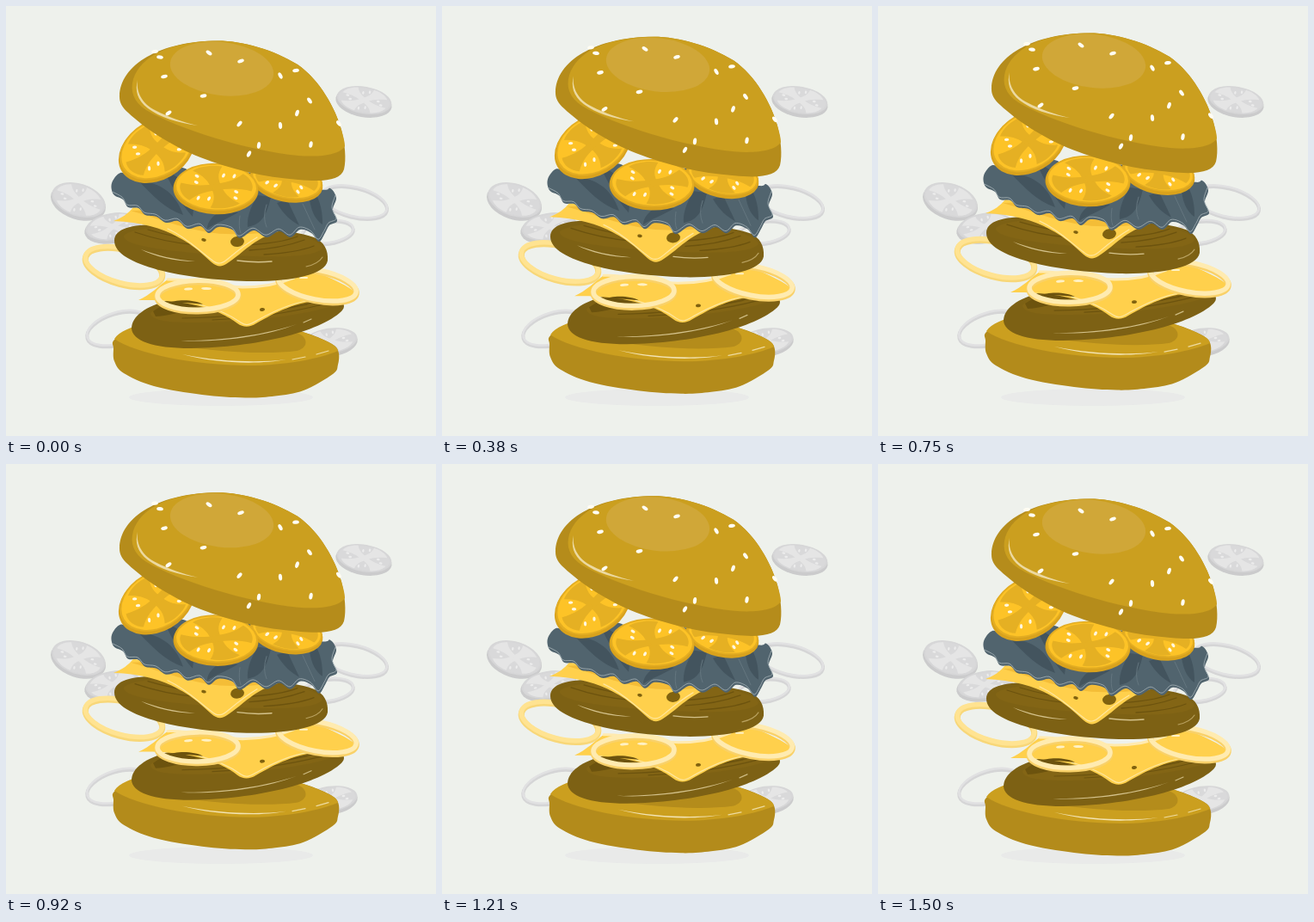
Recreate the animation shown at these times as an HTML page. Size 500 by 500 pixels, loop 1.54 s.

```html
<!DOCTYPE html>
<html lang="en">
<head>
<meta charset="utf-8">
<title>Floating burger</title>
<style>
  html, body { margin: 0; width: 100%; height: 100%; overflow: hidden; background: #eef1ec; }
  svg { display: block; width: 100vw; height: 100vh; }
</style>
</head>
<body>
<svg viewBox="0 0 500 500">
  <g id="back"></g>
  <g id="burger"></g>
</svg>
<script>
const STEP = 1000 / 24, STEPS = 36, LOOP = 1540, PEAK = 17.6, LIFT = 9;

const path = (d, fill, extra = '') => `<path d="${d}" fill="${fill}" ${extra}/>`;
const line = (d, color, width, extra = '') =>
  path(d, 'none', `stroke="${color}" stroke-width="${width}" stroke-linecap="round" stroke-linejoin="round" ${extra}`);
const oval = (x, y, rx, ry, turn, fill, extra = '') =>
  `<ellipse rx="${rx}" ry="${ry}" transform="translate(${x} ${y}) rotate(${turn})" fill="${fill}" ${extra}/>`;

// Smooth curve through a flat list of coordinates
function smooth(flat, closed) {
  const p = [];
  for (let i = 0; i < flat.length; i += 2) p.push([flat[i], flat[i + 1]]);
  const n = p.length;
  const at = i => closed ? p[(i + n) % n] : p[Math.max(0, Math.min(n - 1, i))];
  let d = `M${p[0]}`;
  for (let i = 0; i < (closed ? n : n - 1); i++) {
    const [a, b, c, e] = [at(i - 1), at(i), at(i + 1), at(i + 2)];
    const c1 = [0, 1].map(k => b[k] + (c[k] - a[k]) / 6);
    const c2 = [0, 1].map(k => c[k] - (e[k] - b[k]) / 6);
    d += `C${c1} ${c2} ${c}`;
  }
  return d + (closed ? 'Z' : '');
}

// Tomato slice: rim, face, four flared arms on a unit disc, two pips between arms
function slice(x, y, rx, ry, turn, spin, tone) {
  const cx = x + .5, cy = y - 1.5;
  let s = oval(x, y + 1.2, rx, ry, turn, tone.rim) + oval(cx, cy, rx - .8, ry - 1.2, turn, tone.edge) +
    oval(cx, cy, rx - 3, ry - 3, turn, tone.face);
  s += `<g transform="translate(${cx} ${cy}) rotate(${turn}) scale(${rx} ${ry}) rotate(${spin + 45})">`;
  for (let k = 0; k < 4; k++) {
    s += `<g transform="rotate(${k * 90})">` +
      path('M-.05 -.13C.25 -.11 .5 -.16 .76 -.36C.89 -.16 .89 .16 .76 .36C.5 .16 .25 .11 -.05 .13Z', tone.arm) + '</g>';
  }
  s += '</g>';
  const r = turn * Math.PI / 180;
  for (let k = 0; k < 4; k++) for (const [dist, off] of [[.5, -.16], [.62, .24]]) {
    const a = (spin + k * 90) * Math.PI / 180 + off;
    const u = Math.cos(a) * dist * rx, v = Math.sin(a) * dist * ry;
    s += oval(cx + u * Math.cos(r) - v * Math.sin(r), cy + u * Math.sin(r) + v * Math.cos(r),
      tone.pip, tone.pip * .62, turn + spin + k * 90, tone.seed);
  }
  return s;
}

function ring(x, y, rx, ry, turn, color, shade, width) {
  return oval(x, y + 1, rx, ry, turn, 'none', `stroke="${shade}" stroke-width="${width}"`) +
    oval(x, y - .8, rx, ry, turn, 'none', `stroke="${color}" stroke-width="${width - 1.5}"`);
}

const grey = { rim: '#cbcbcc', edge: '#d6d6d7', face: '#d9d9da', arm: '#e5e5e5', seed: '#ececec', pip: 1.9 };
const gold = { rim: '#d9a21c', edge: '#e3ad22', face: '#fdc327', arm: '#e5b023', seed: '#fff7df', pip: 2.7 };

function backdrop() {
  const hoop = (x, y, rx, ry, turn) => ring(x, y, rx, ry, turn, '#e1e1e2', '#d5d5d6', 4);
  return oval(250, 455, 107, 10, 0, '#e9eae9') +
    hoop(405, 228, 39, 17, 14) + hoop(374, 263, 30, 13, -8) + hoop(130, 375, 37, 18, -17) +
    slice(416, 111, 33, 17, 10, 0, grey) +
    slice(84, 227, 33, 20, 18, -10, grey) +
    slice(124, 258, 33, 17, -9, 0, grey) +
    slice(376, 391, 33, 16, -8, 0, grey);
}

function bottomBun() {
  const side = [126, 388, 150, 374, 220, 363, 300, 367, 345, 379, 367, 387, 382, 395, 387, 404, 386, 417,
    380, 428, 346, 447, 313, 453.5, 278, 455.5, 228, 452, 172, 442, 137, 427, 126, 413, 125, 398];
  return path(smooth(side, true), '#b38b1b') +
    path('M126 387C132 378 145 373 165 369C230 355 315 367 345 379C365 386 386 394 386 401C365 410 325 418 282 418C220 418 150 404 126 387Z', '#cb9f1f') +
    path('M175 390C220 368 320 368 344 383C352 390 349 398 338 401C300 406 230 402 175 390Z', '#b48c1b') +
    path('M205 405C250 414 295 415 326 411C295 417 245 416 205 405Z', '#f3e4b4') +
    line('M333 411L348 408M361 405L375 401', '#eedb9f', 1.2);
}

function lowPatty() {
  return path('M146 375C146 361 162 349 190 342C250 328 350 330 385 341C394 344 395 350 390 355C365 379 290 397 215 398C170 398 147 389 146 375Z', '#7d6114') +
    path('M168 357C180 343 240 334 300 335C345 335 380 338 386 345C370 356 290 368 220 368C190 368 168 366 168 357Z', '#836515') +
    path('M171 355C185 343 215 340 232 344C222 350 196 360 174 361Z', '#6c530e') +
    line('M205 363Q280 362 350 347M240 365Q310 362 368 347M320 351Q345 349 363 343', '#6c530e', 1.2) +
    path('M203 389C245 390 300 383 338 370C300 385 245 391.5 203 389Z', '#d4c28b') +
    line('M346 368L355 364', '#cdbb82', 1.2);
}

function lowCheese() {
  const back = 'C215 317 245 325 275 327C300 327 318 323 335 316';
  return path(`M154 342C168 336 178 325 188 318${back}L355 308C380 316 398 326 409 335C408 341 390 342 370 342C338 343 312 357 291 369C283 374 276 374 269 369C245 350 205 341 154 342Z`, '#ffd04c') +
    line(`M188 318${back}`, '#ffeab0', 3) +
    line('M225 347C248 353 262 360 273 368C280 373 284 370 293 365C311 355 330 346 350 343', '#ffe79f', 1.2) +
    path('M187 346C197 341 219 341 229 347C216 345 201 345 187 346Z', '#6c530e') +
    oval(298, 353, 3, 1.9, -8, '#80620f') +
    oval(212, 329, 5, 1.5, -4, '#fff1c4') + oval(233, 328.5, 6, 1.5, 2, '#fff1c4') +
    line('M328 313L337 315M342 316L350 316', '#fff1c4', 2);
}

function onions() {
  const pale = '#ffebb0', shade = '#f9d169';
  return ring(137, 303, 46, 20, 15, '#ffe391', '#f8d778', 7) +
    ring(362, 325, 46, 17, 11, pale, shade, 7) +
    ring(223, 337, 47, 17, -1, pale, shade, 7);
}

function topPatty() {
  return path('M126 273C126 259 145 254 178 254C240 253 330 258 358 269C370 274 375 284 374 296C371 313 330 321 280 320C210 318 126 302 126 273Z', '#7d6114') +
    path('M137 267C150 255 215 255 270 259C330 262 365 270 368 281C363 292 315 293 262 290C190 286 135 279 137 267Z', '#836515') +
    line('M150 263Q185 275 222 278M165 260Q195 269 225 272M283 284Q320 282 347 272M278 278Q318 276 339 268M300 289Q337 287 358 279', '#6c530e', 1.3) +
    path('M157 283C175 290 196 295 220 297C196 297 172 291 157 283Z', '#d4c28b') +
    line('M269 296Q290 299 309 297', '#d4c28b', 1.4) +
    line('M349 303Q363 300 368 292', '#b9a260', 1.1);
}

function topCheese() {
  return path('M125 250C136 246 142 241 148 234L330 258C315 262 301 267 289 275C276 284 266 294 256 300C250 304 245 303 239 298C221 281 190 252 125 250Z', '#ffd04c') +
    path('M145 238C180 248 220 264 255 265C285 266 310 264 325 258L240 235Z', '#f4bd37') +
    line('M188 259C210 269 224 284 239 295C246 301 251 300 258 294C270 284 280 276 292 269', '#ffe79f', 1.2) +
    oval(230, 272, 2.8, 1.8, 10, '#80620f') + oval(269, 274, 8, 6, -8, '#80620f');
}

function lettuce() {
  const rim = [384, 223, 380, 237, 385, 250, 376, 255, 371, 264, 364, 274, 355, 264, 342, 260, 331, 269,
    318, 262, 303, 269, 288, 261, 272, 270, 263, 260, 247, 257, 236, 264, 226, 256, 211, 259,
    200, 250, 186, 252, 175, 245, 162, 243, 154, 235, 142, 234, 136, 225, 125, 219];
  const top = [123, 206, 133, 194, 148, 199, 168, 197, 188, 188, 205, 188, 225, 193, 300, 195, 365, 213, 377, 212];
  const folds = ['M153 202C177 206 196 214 206 243C185 236 170 220 153 202Z',
    'M184 192C207 198 222 220 217 245C203 230 194 211 184 192Z',
    'M293 220C283 235 280 248 281 257C296 254 303 245 308 222Z',
    'M315 229C323 243 332 250 341 255C335 242 331 234 327 225Z',
    'M249 239C240 244 234 251 234 259C244 252 257 248 270 240Z',
    'M353 225C355 239 360 249 368 254C368 240 366 231 362 222Z'];
  return path(smooth(rim.concat(top), true), '#51646e') +
    folds.map(d => path(d, '#43545e')).join('') +
    line('M303 231Q298 246 303 257M345 230Q352 245 359 260M272 244Q270 257 273 264', '#64767f', 1) +
    line(smooth(rim, false), '#a7b4b9', .8, 'transform="translate(-1 -2.8)"');
}

function tomatoes() {
  return slice(175, 167, 47, 34, -30, 28, gold) +
    slice(326, 202.5, 43, 24, 12, 40, gold) +
    slice(244, 212, 49.5, 29, 2, 28, gold);
}

function topBun() {
  const seeds = [[173, 53, -8], [179, 59.5, 8], [236, 54.5, 35], [273, 64, -18], [337, 75, -8], [319, 81, 62],
    [184, 82, -14], [229.5, 104.5, -12], [353, 110, 55], [338.5, 124.5, -72], [189, 124.5, -35], [271.5, 137, -50],
    [319, 139, 85], [387, 136.5, 52], [294, 162, 98], [354.5, 161, 100], [282.5, 172, -62]];
  const crown = 'C276 40.5 311 51 339 68C365 86 383 119 390 144';
  return path(`M132 106C132 68 180 40.5 246 40.5${crown}C394 160 396 178 393 190C389 202 372 205 340 202C300 199 262 190 226 176C193 163 161 142 142 124C135 118 132 112 132 106Z`, '#b58c1b') +
    path(`M177 54C196 45 220 40.5 246 40.5${crown}C392 151 394 158 394 163C388 173 366 176 340 174C280 168 200 143 163 121C148 111 144 99 148 85C152 72 163 61 177 54Z`, '#cb9f1f') +
    oval(251, 73, 60.5, 31, 7, '#d0a738') +
    path('M153 86C151 101 159 114 174 121.5C190 129.5 205 135 223 139C200 136 178 129 165 119C152 109 150 98 153 86Z', '#ecd9a0') +
    seeds.map(([x, y, a]) => oval(x, y, 3.9, 2.1, a, '#fffdf3')).join('');
}

const burger = document.getElementById('burger');
document.getElementById('back').innerHTML = backdrop();
burger.innerHTML = [bottomBun, lowPatty, lowCheese, onions, topPatty, topCheese, lettuce, tomatoes, topBun]
  .map(part => part()).join('');

// Halfway between a linear and a cosine ease
const ease = u => (u + (1 - Math.cos(Math.PI * u)) / 2) / 2;

function draw(ms) {
  const i = Math.min(STEPS, Math.floor((ms % LOOP + 4) / STEP));
  const u = i < PEAK ? i / PEAK : (STEPS - i) / (STEPS - PEAK);
  burger.setAttribute('transform', `translate(0 ${(-LIFT * ease(u)).toFixed(2)})`);
}

let start;
function tick(now) {
  start ??= now;
  draw(now - start);
  requestAnimationFrame(tick);
}
draw(0);
requestAnimationFrame(tick);
</script>
</body>
</html>
```
